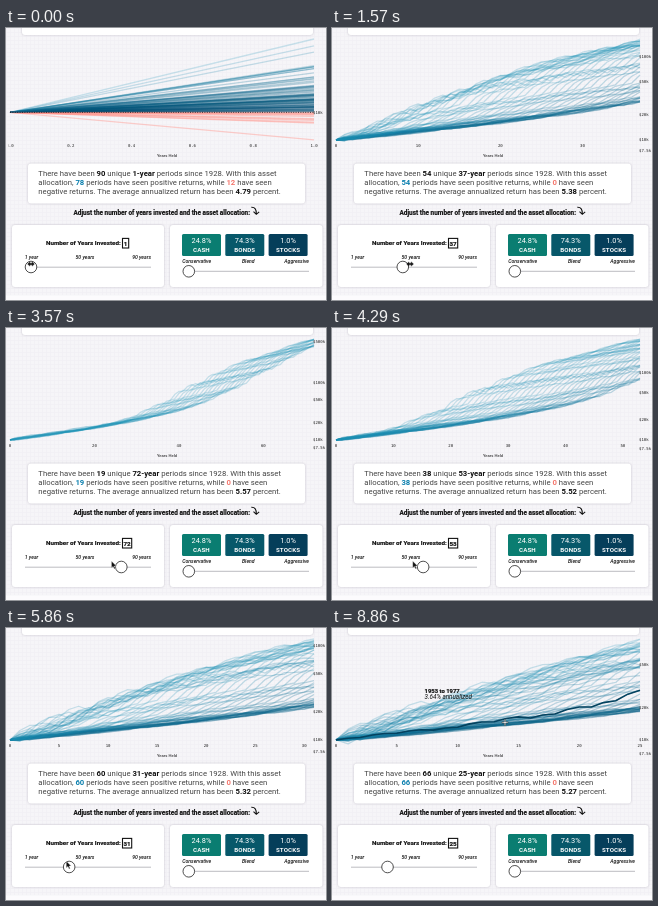
Write an HTML page that moves like this. It is 320 px wide and 272 px high and loops after 9010 ms.

```html
<!DOCTYPE html>
<html lang="en">
<head>
<meta charset="utf-8">
<title>Returns by holding period</title>
<style>
html, body { margin: 0; width: 100%; height: 100%; overflow: hidden; background: #f5f4f7; }
svg { display: block; width: 100vw; height: 100vh; }
text { font-family: Roboto, "Open Sans", sans-serif; fill: #111; }
.body text { font-size: 7.72px; fill: #444; }
.body .b { font-weight: 700; fill: #111; }
.body .pos { font-weight: 700; fill: #0b7fae; }
.body .neg { font-weight: 700; fill: #f4776d; }
.axis { font: 4px "DejaVu Sans Mono", monospace; fill: #222; }
.head { font-size: 6.25px; font-weight: 700; stroke: #111; stroke-width: .18; }
.title { font-size: 6.43px; }
.hint { font-size: 5.1px; font-style: italic; font-weight: 500; }
.mid { text-anchor: middle; }
.tile text { fill: #fff; text-anchor: middle; }
.card { fill: #fff; filter: drop-shadow(.6px .8px 1.3px rgba(60, 50, 80, .26)); }
.track { stroke: #b5b5ba; stroke-width: .9; }
.knob { fill: #fff; stroke: #222; stroke-width: .8; }
#when { font-size: 5.9px; }
#rate { font-size: 6.3px; font-weight: 400; }
#lines path { fill: none; stroke-linejoin: round; stroke-width: 1.3; }
</style>
</head>
<body>
<svg viewBox="0 0 320 272" preserveAspectRatio="none">
  <defs>
    <pattern id="grid" width="4" height="4" patternUnits="userSpaceOnUse">
      <path d="M0 .5H4M.5 0V4" stroke="#f0eef3" stroke-width=".6"/>
    </pattern>
    <clipPath id="plot"><rect x="2.5" y="0" width="317" height="134"/></clipPath>
  </defs>
  <rect width="320" height="272" fill="#f6f5f8"/>
  <rect width="320" height="267" fill="url(#grid)"/>
  <rect y="267.5" width="320" height="5" fill="#fcfbfd"/>

  <g clip-path="url(#plot)">
    <g id="lines"></g>
    <path id="base" stroke="#111" stroke-width=".9" stroke-dasharray="1 1.4"/>
    <path id="hot" fill="none" stroke="#04425f" stroke-width="1.6" stroke-linejoin="round"/>
    <g id="ticks"></g>
  </g>
  <text class="mid" x="161" y="129" font-size="4.2">Years Held</text>
  <rect class="card" x="16" y="-10" width="291" height="17" rx="3"/>

  <rect class="card" x="22" y="135.5" width="277" height="40" rx="3"/>
  <g class="body">
    <text x="32.3" y="148.3">There have been <tspan class="b" id="count"></tspan> unique <tspan class="b" id="span"></tspan> periods since 1928. With this asset</text>
    <text x="32.3" y="157.3">allocation, <tspan class="pos" id="pos"></tspan> periods have seen positive returns, while <tspan class="neg" id="neg"></tspan> have seen</text>
    <text x="32.3" y="166.3">negative returns. The average annualized return has been <tspan class="b" id="avg"></tspan> percent.</text>
  </g>

  <text class="head title" x="67.5" y="187">Adjust the number of years invested and the asset allocation:</text>
  <path d="M245.3 179.3q5.4-.4 5 6.8M247.5 183.7l2.8 2.6 2.9-2.4" fill="none" stroke="#111" stroke-width="1.1"/>

  <rect class="card" x="6" y="197" width="152" height="62" rx="3"/>
  <text class="head" x="40" y="217.3">Number of Years Invested:</text>
  <rect id="box" x="116.5" y="210.4" height="9.6" fill="#fff" stroke="#111" stroke-width="1.1"/>
  <text id="years" class="head mid" y="217.6"></text>
  <text class="hint" x="18.8" y="230.6">1 year</text>
  <text class="hint mid" x="79" y="230.6">50 years</text>
  <text class="hint" x="145" y="230.6" text-anchor="end">90 years</text>
  <path class="track" d="M19 239.2H145"/>
  <circle id="knob" class="knob" cy="239" r="5.8"/>

  <rect class="card" x="164" y="197" width="152.5" height="62" rx="3"/>
  <g id="tiles" class="tile"></g>
  <text class="hint" x="176.3" y="235">Conservative</text>
  <text class="hint mid" x="242.3" y="235">Blend</text>
  <text class="hint" x="303" y="235" text-anchor="end">Aggressive</text>
  <path class="track" d="M177 243.3H303"/>
  <circle class="knob" cx="182.8" cy="243.3" r="5.8"/>

  <g id="tip">
    <text id="when" class="head"></text>
    <text id="rate" class="hint" y="6"></text>
  </g>
  <path id="mouse" stroke-linejoin="round"/>
</svg>
<script>
const $ = id => document.getElementById(id);
const LOOP = 9010, FPS = 7, FIRST = 1928, YEARS = 90;
const LEFT = 4, WIDTH = 304, TOP = 11, BOTTOM = 111.9;

const mix = (a, b, k) => a + (b - a) * k;
const clamp = x => Math.min(1, Math.max(0, x));

// Straight lines through a few [x, y] points
function at(points, x) {
  const i = Math.max(1, points.findIndex(p => x <= p[0]));
  const [x0, y0] = points[i - 1], [x1, y1] = points[i];
  return mix(y0, y1, clamp((x - x0) / (x1 - x0)));
}

// Long-run level of yearly returns in percent
const LEVEL = [[1928, 3.4], [1940, 2.4], [1950, 1.8], [1960, 2.5], [1972, 5], [1981, 8],
  [1983, 11.5], [1993, 11], [1997, 6.5], [2017, 3.5]];
const AVERAGE = [[1, 4.79], [25, 5.27], [37, 5.38], [57, 5.56], [72, 5.57], [90, 5.58]];

// Golden-ratio steps spread good and bad years evenly
function yearReturn(year) {
  const u = (year - 1900) * .618034 % 1 - .1348;
  return at(LEVEL, year) / 100 * 2.9 * u * (u < 0 ? 2 : 1);
}
const fund = [1];
for (let i = 0; i < YEARS; i++) fund.push(fund[i] * (1 + yearReturn(FIRST + i)));
const growth = (s, k) => .99 * fund[s + k] / fund[s] + .01 * Math.exp(.097 * k);

// Holding period by step
const HOLD = [[0, 1], [2, 2], [11, 37], [18, 57], [23, 73], [25, 72], [34, 37], [47, 25], [63, 25]];
const holdAt = f => Math.round(at(HOLD, f));
const knobX = n => 25 + 1.272 * (n - 1);

function add(parent, tag, attrs, text = "") {
  const el = document.createElementNS("http://www.w3.org/2000/svg", tag);
  for (const k in attrs) el.setAttribute(k, attrs[k]);
  el.textContent = text;
  parent.append(el);
  return el;
}
const set = (el, attrs) => { for (const k in attrs) el.setAttribute(k, attrs[k]); };

[["24.8%", "CASH", "#0a7d71"], ["74.3%", "BONDS", "#07586a"], ["1.0%", "STOCKS", "#053e5a"]].forEach(([pct, name, fill], i) => {
  const x = 176 + i * 43.3, mid = x + 19.4;
  add($("tiles"), "rect", { x, y: 206, width: 39, height: 22, rx: 1.5, fill });
  add($("tiles"), "text", { x: mid, y: 215.3, "font-size": 7.4 }, pct);
  add($("tiles"), "text", { x: mid, y: 224.3, "font-size": 6.2, "font-weight": 700, "letter-spacing": .1 }, name);
});
const paths = Array.from({ length: YEARS }, () => add($("lines"), "path", {}));

// Round tick distance: 1, 2, 5 or 10 times a power of ten
function tickStep(n) {
  const raw = n / 5, p = 10 ** Math.floor(Math.log10(raw)), e = raw / p;
  return p * (e >= 7.07 ? 10 : e >= 3.16 ? 5 : e >= 1.414 ? 2 : 1);
}

function drawTicks(n, y) {
  const g = $("ticks"), step = tickStep(n);
  g.textContent = "";
  for (let i = 0; i * step < n + .001; i++)
    add(g, "text", { class: "axis mid", x: LEFT + WIDTH * i * step / n, y: 119 }, (i * step).toFixed(step < 1 ? 1 : 0));
  for (const k of [7.5, 10, 20, 50, 100, 500]) {
    const ty = y(Math.log(k / 10));
    if (ty > 9 && ty < 131) add(g, "text", { class: "axis", x: 307, y: ty + 1.4 }, `$${k}k`);
  }
}

function drawChart(n, hot) {
  const count = YEARS - n + 1;
  const runs = Array.from({ length: count }, (_, s) =>
    Array.from({ length: n + 1 }, (_, k) => Math.log(growth(s, k))));
  const ends = runs.map(run => run[n]);
  const lo = Math.min(0, ...ends), hi = Math.max(...ends);
  const y = v => mix(BOTTOM, TOP, (v - lo) / (hi - lo));
  const trace = run => "M" + run.map((v, k) => (LEFT + WIDTH * k / n).toFixed(2) + " " + y(v).toFixed(2)).join("L");

  paths.forEach((p, s) => {
    p.style.display = s < count ? "" : "none";
    if (s >= count) return;
    const up = ends[s] > 0, rank = clamp(ends[s] / hi);
    set(p, {
      d: trace(runs[s]),
      stroke: up ? `rgb(${30 * rank},${mix(75, 145, rank)},${mix(112, 180, rank)})` : "#ff8f86",
      "stroke-opacity": up ? mix(.32, .22, rank) : .42
    });
  });
  set($("base"), { d: `M${LEFT} ${y(0)}H${LEFT + WIDTH}`, opacity: n < 4 ? .85 : 0 });
  set($("hot"), { d: hot ? trace(runs[hot - FIRST]) : "" });
  drawTicks(n, y);

  const pos = ends.filter(v => v > 0).length;
  const labels = { count, span: n + "-year", pos, neg: count - pos, avg: at(AVERAGE, n).toFixed(2), years: n };
  for (const id in labels) $(id).textContent = labels[id];
  const w = n > 9 ? 9.2 : 6.2;
  set($("box"), { width: w });
  set($("years"), { x: 116.5 + w / 2 });
  set($("knob"), { cx: knobX(n) });
}

const CURSORS = {
  resize: ["M-3.4 3L-1.2.9V2.2H1.2V.9L3.4 3 1.2 5.1V3.8H-1.2V5.1Z", "#111", "#111", .4],
  arrow: ["M0 0V7L1.7 5.5 2.8 8 4 7.5 2.9 5.1H5Z", "#111", "#fff", .4],
  cross: ["M-3-.6H-.6V-3H.6V-.6H3V.6H.6V3H-.6V.6H-3Z", "#fff", "#333", .5]
};

// The mouse runs ahead of the handle, then glides up to the chart
function drawMouse(f) {
  const k = clamp((f - 48) / 4), glide = k * k * (3 - 2 * k);
  const lead = f ? Math.min(f + 2, 62) : 0;
  const x = mix(knobX(at(HOLD, lead)), 173, glide);
  const y = mix(233, 91 + .35 * (f - 52), glide);
  const [d, fill, stroke, width] = CURSORS[f < 15 ? "resize" : k < .7 ? "arrow" : "cross"];
  set($("mouse"), { d, fill, stroke, "stroke-width": width, transform: `translate(${x} ${y})` });
  return [x, y];
}

function draw(f) {
  const n = holdAt(f), k = (f - 52) / 10;
  const hot = k < 0 ? 0 : Math.round(mix(1932, 1953, k));
  drawChart(n, hot);
  const [x, y] = drawMouse(f);
  $("tip").style.display = hot ? "" : "none";
  set($("tip"), { transform: `translate(${x - 80.5} ${y - 28.3 - 1.5 * k})` });
  $("when").textContent = `${hot} to ${hot + n - 1}`;
  $("rate").textContent = mix(2.73, 3.64, k).toFixed(2) + "% annualized";
}

const start = performance.now();
let last = -1;
function tick() {
  const t = Math.max(0, performance.now() - start) % LOOP;
  const f = Math.min(62, Math.floor((t + 5) * FPS / 1000));
  if (f !== last) draw(last = f);
  requestAnimationFrame(tick);
}
tick();
</script>
</body>
</html>
```
